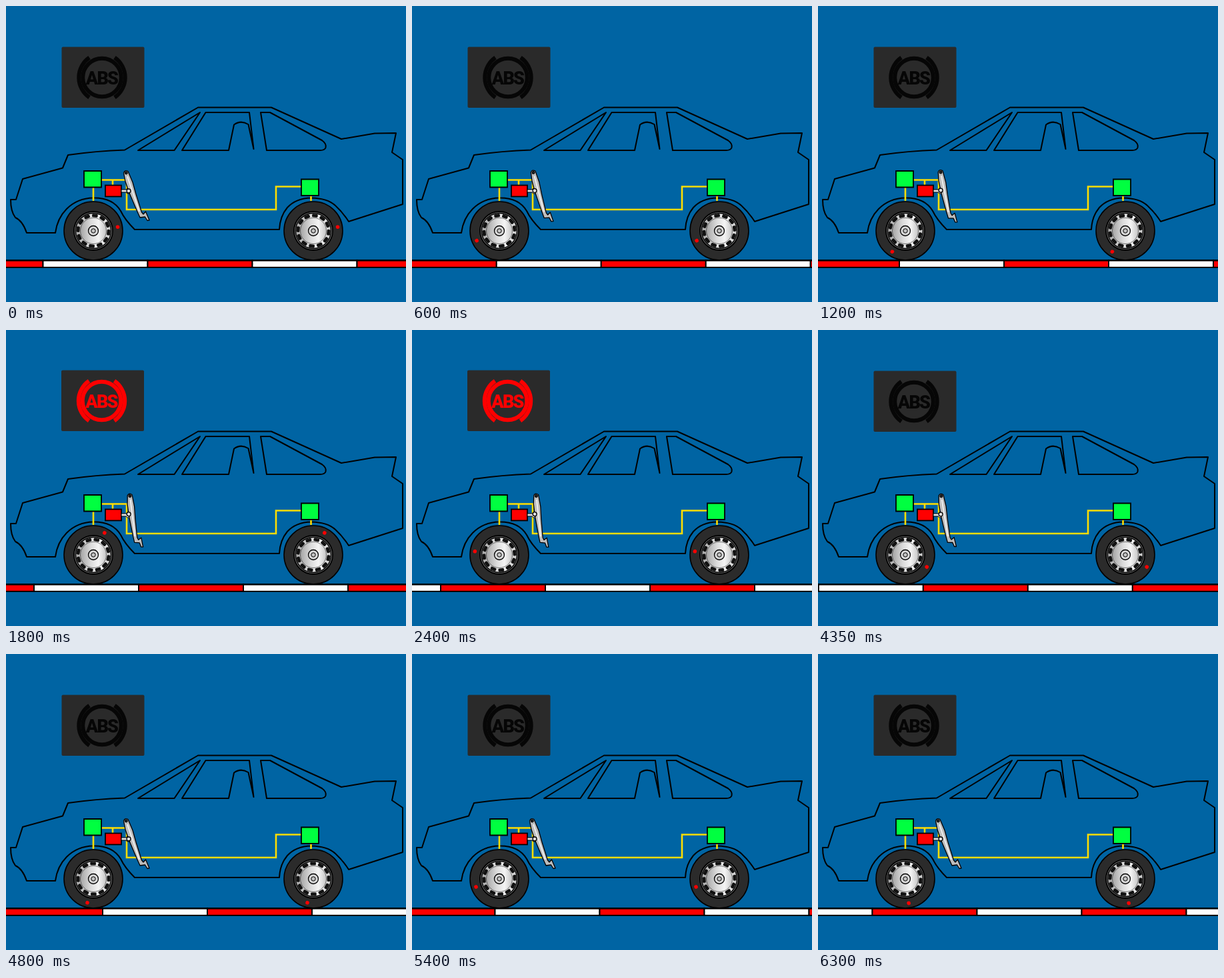
These frames come from a looping animation (600 px wide and 445 px high, 6.45 s). An HTML page:

```html
<!DOCTYPE html>
<html lang="en">
<head>
<meta charset="utf-8">
<title>Anti-lock braking</title>
<style>
html, body { margin: 0; width: 100%; height: 100%; overflow: hidden; background: #0064a3; }
svg { display: block; width: 600px; height: 445px; }
</style>
</head>
<body>
<svg viewBox="0 0 600 445" xmlns="http://www.w3.org/2000/svg">
  <defs>
    <linearGradient id="metal">
      <stop offset="0" stop-color="#a4a4a4"/>
      <stop offset=".4" stop-color="#dadada"/>
      <stop offset=".7" stop-color="#f4f4f4"/>
      <stop offset="1" stop-color="#c4c4c4"/>
    </linearGradient>
  </defs>
  <rect width="600" height="445" fill="#0064a3"/>

  <rect id="panel" x="83.5" y="61.5" width="124" height="91.500" rx="2" fill="#2a2a2a"/>
  <g id="lamp" fill="none" stroke="#060606" stroke-width="6">
    <circle cx="144" cy="107.500" r="28.800"/>
    <path d="M125 77.500A36.500 36.500 0 0 0 125 137.500M163 77.500A36.500 36.500 0 0 1 163 137.500"/>
    <text id="label" x="143.500" y="118" fill="#060606" stroke="none" text-anchor="middle"
      font-family="Roboto, 'Liberation Sans', sans-serif" font-weight="900" font-size="27" letter-spacing="-1.800">ABS</text>
  </g>

  <g fill="none" stroke="#000" stroke-width="2" stroke-linejoin="round">
    <path d="M7 291H15L25 260L85 243.500L93 224Q135 218 178 216.500L288 152.500H398L503 200L553 191.500L585 191L579 220L595 231V298L514 324
      Q505 310 494 300Q482 289 458 288.500Q435 289 422 303Q411 316 410 336H193
      Q178 321 172 308Q160 288 131 288.500Q107 289 91 305Q77 319 74 341H31Q25 323 14 318Q7 309 7 291Z"/>
    <path d="M198 217L291 160L252.500 217Z"/>
    <path d="M264 217L299.500 160H365L371.500 215L363.500 178Q352 171 342 178.500L334 217Z"/>
    <path d="M382 160H396L474 202Q481 207 479.500 213Q478 217 471 217H391Z"/>
  </g>

  <path d="M131 272V293M143 261.500H181V306H405V271.500H443M160 261V270M457.500 285V293" fill="none" stroke="#fd0" stroke-width="2.600"/>
  <g stroke="#000" stroke-width="1.800">
    <path d="M117 248H143V272.500H117ZM443 260.500H469V285H443Z" fill="#00ff40"/>
    <rect x="149" y="269.500" width="24" height="17" fill="#f00"/>
    <path d="M173 276H180L182 274H187V282H182L180 280H173Z" fill="#e0e0e0" stroke-width="1"/>
  </g>

  <g id="pedal" stroke="#000" stroke-width="1.300" stroke-linejoin="round">
    <path d="M176.500 251Q178 246 183 248.500L190 265L195 283L203.500 310L206 313L209.500 309L215 322L212 322.500L208.500 317L201 318L196 307L185 281L179 264Z" fill="#bdbdbd"/>
    <path d="M182 256L187 271L200 309" fill="none" stroke="#eee" stroke-width="2"/>
    <circle cx="180.300" cy="251" r="1.800" fill="#333"/>
    <circle cx="184" cy="278" r="3" fill="#ddd"/>
  </g>

  <g id="road"></g>
  <path d="M0 382.500H600M0 393H600" stroke="#000" stroke-width="1.800"/>
  <g id="wheels"></g>
</svg>
<script>
const $ = id => document.getElementById(id);

function add(parent, tag, attrs) {
  const el = document.createElementNS("http://www.w3.org/2000/svg", tag);
  for (const key in attrs) el.setAttribute(key, attrs[key]);
  parent.appendChild(el);
  return el;
}

const STEP = 150, LOOP = 6450, STRIPE = 157;
const REST = 23;     // step at which the car stands still
const PRESSED = 12.6;

// Travel of road (px) and wheel (degrees) with their speeds at key steps
const keys = [0, 8, 16, 23, 27, 31, 37, 38];
const roadPos = [212.5, 907, 1299, 1400, 1558, 1851.5, 2593.5, 2724.5];
const roadVel = [106, 68, 30, 0, 58, 92, 128, 131];
const spinPos = [9, 958, 1252, 1375, 1696, 1999, 2798, 2889];
const spinVel = [140, 60, 22, 0, 78, 90, 110, 91];

function travel(k, pos, vel) {
  let i = 0;
  while (i < keys.length - 2 && k >= keys[i + 1]) i++;
  const h = keys[i + 1] - keys[i];
  const u = (k - keys[i]) / h, w = 1 - u;
  return w * w * ((1 + 2 * u) * pos[i] + u * h * vel[i])
    + u * u * ((1 + 2 * w) * pos[i + 1] - w * h * vel[i + 1]);
}

for (let i = -2; i < 4; i++) {
  add($("road"), "rect", {
    x: i * STRIPE, y: 382.5, width: STRIPE, height: 10.5,
    fill: i % 2 ? "#fff" : "#f00", stroke: "#000", "stroke-width": 2
  });
}

function makeWheel(cx) {
  const g = add($("wheels"), "g", { transform: `translate(${cx} 338)` });
  const disc = (r, fill, width = 1) =>
    add(g, "circle", { r, fill, stroke: "#000", "stroke-width": width });
  disc(44, "#2b2b2b", 1.6);
  disc(29, "#777", 1.8);
  disc(26.5, "url(#metal)", 1.4);
  const turning = add(g, "g", {});
  for (let i = 0; i < 12; i++) {
    add(turning, "rect", {
      x: -4.3, y: -25.5, width: 8.6, height: 5, rx: 1.5,
      fill: "#111", transform: `rotate(${i * 30 + 15})`
    });
  }
  disc(19.5, "url(#metal)", 0.5);
  disc(7.5, "#d8d8d8", 1.3);
  disc(3.2, "#c4c4c4", 1);
  add(turning, "circle", { cx: 37, r: 2.8, fill: "#f00" });
  return turning;
}
const wheels = [131, 461].map(makeWheel);

function pedalAngle(k) {
  if (k <= REST) return PRESSED * Math.min(1, k / 13);
  return PRESSED * Math.max(0, 1 - (k - REST) / 4);
}

function draw(time) {
  const s = Math.floor((time % LOOP) / STEP);
  const k = s <= REST ? s : Math.max(REST, s - 5);

  const shift = travel(k, roadPos, roadVel) % (2 * STRIPE);
  $("road").setAttribute("transform", `translate(${shift} 0)`);

  const spin = travel(k, spinPos, spinVel) % 360;
  for (const w of wheels) w.setAttribute("transform", `rotate(${-spin})`);

  $("pedal").setAttribute("transform", `rotate(${pedalAngle(k)} 190 278)`);

  const lit = k >= 10 && k <= 20;
  const color = lit ? "#f00" : "#060606";
  $("lamp").setAttribute("stroke", color);
  $("label").setAttribute("fill", color);
  $("lamp").setAttribute("transform", lit ? "translate(-.5 -1)" : "");
  $("panel").setAttribute("transform", lit ? "translate(-.5 -1)" : "");
}

const start = performance.now();
function tick() {
  draw(performance.now() - start);
  requestAnimationFrame(tick);
}
tick();
</script>
</body>
</html>
```
